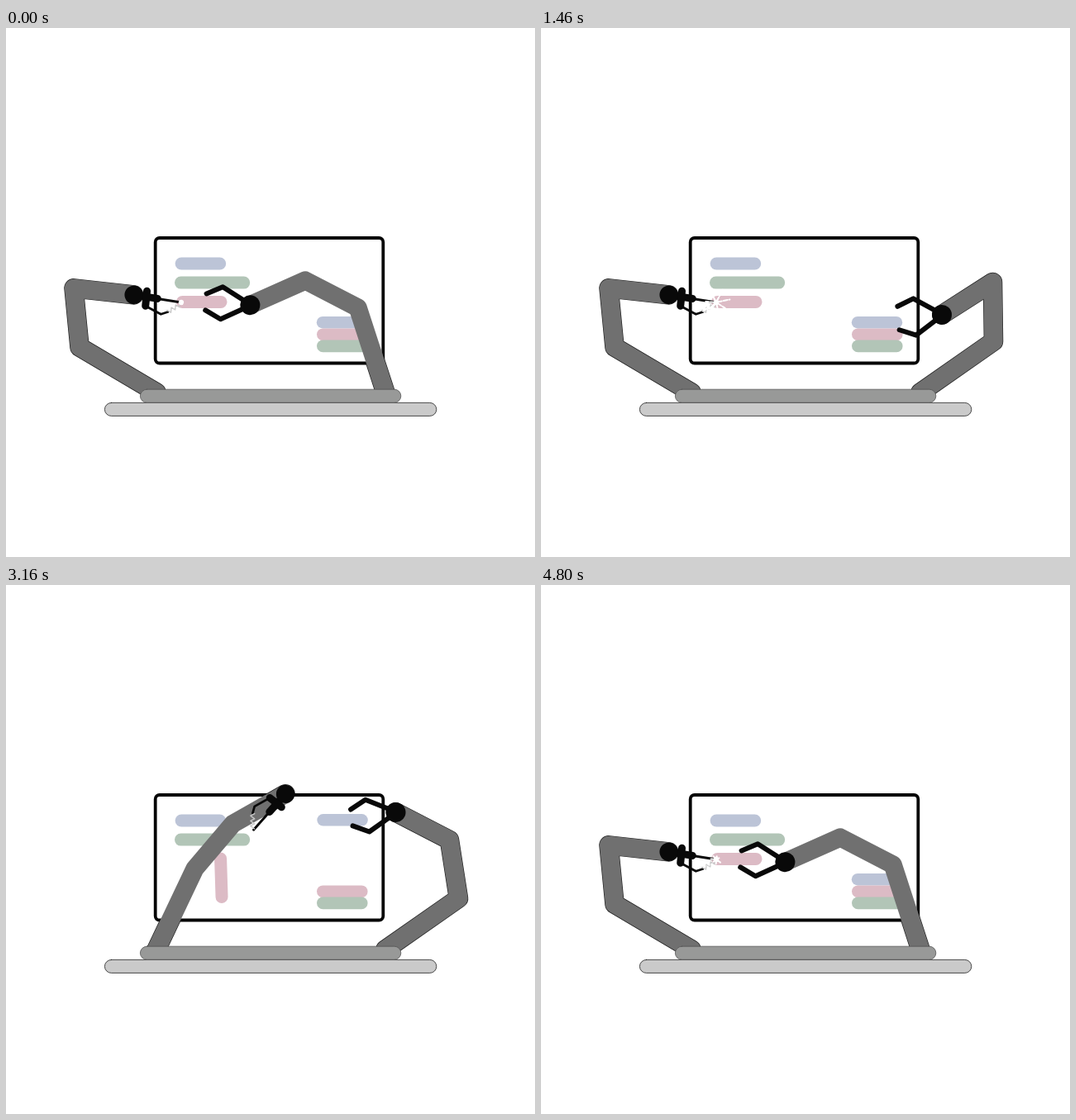
An HTML page with a canvas for the animation above (4820 ms loop, 640 by 640 pixels).

```html
<!DOCTYPE html>
<html lang="en">
<head>
<meta charset="utf-8">
<title>Robot arms</title>
<style>
  html, body { margin: 0; width: 640px; height: 640px; overflow: hidden; background: #fff; }
  canvas { display: block; }
</style>
</head>
<body>
<canvas id="stage" width="640" height="640"></canvas>
<script>
const ctx = document.getElementById('stage').getContext('2d');
const LOOP = 4820;
const BLACK = '#090909', ARM = '#707070', EDGE = '#222';
const BLUE = '#bcc4d7', GREEN = '#b2c5b7', PINK = '#dcbbc5';
const LENGTHS = [108, 71.5, 73];
const rad = deg => deg * Math.PI / 180;

// Poses: three absolute segment angles and the tool angle, in degrees.
const L_REST = [-149.4, -95.6, 6.3, 9];
const L_CUT = [-64.6, -49.7, -29.6, 131.6];
const L_BACK = [-145.6, -110.2, -30, 90];
const leftKeys = [
  [0, ...L_REST], [1740, ...L_REST],
  [2200, -92.6, -66, -16.8, 108.7],
  [2460, -50, -42, -36, 134],
  [2740, ...L_CUT], [3300, ...L_CUT],
  [3560, -95, -75, -30, 120],
  [3780, -118, -86, -30, 105],
  [4080, ...L_BACK], [4360, ...L_BACK],
  [4760, ...L_REST], [LOOP, ...L_REST]
];

const R_REST = [-108, -152.7, 156, 184];
const R_STACK = [-35, -90.8, 147.4, 175.5];
const R_LIFT = [-35, -98.9, 207.3, 173];
const rightKeys = [
  [0, ...R_REST], [620, ...R_REST],
  [820, -105.3, -150.6, 157.4, 180],
  [1080, -75, -113, 190, 178],
  [1140, -68, -101, 198, 178],
  [1310, -30, -83, 168, 176],
  [1440, ...R_STACK], [1660, ...R_STACK],
  [2120, ...R_LIFT], [3280, ...R_LIFT],
  [3720, ...R_STACK], [3790, ...R_STACK],
  [4120, -82.2, -132.7, 167.1, 92.5],
  [4340, -94, -143, 161, 125],
  [4700, ...R_REST], [LOOP, ...R_REST]
];

const jawKeys = [[0, 0], [560, 0], [720, 1], [1520, 1], [1640, 0], [3720, 0], [3800, 1], [4560, 1], [4720, 0], [LOOP, 0]];
const blueKeys = [[0, 356.2], [1660, 356.2], [2120, 284.3], [3280, 284.3], [3720, 356.2], [LOOP, 356.2]];
const swingKeys = [[0, 0], [2720, 0], [2900, -100], [3060, -91.8], [3260, -91.8], [3320, -90], [4440, -90], [4700, 0], [LOOP, 0]];

// Monotone cubic interpolation through the keys; it rests at turning points.
function sample(keys, t) {
  let i = 0;
  while (i < keys.length - 2 && t >= keys[i + 1][0]) i++;
  const [a, b] = [keys[i], keys[i + 1]];
  const span = b[0] - a[0];
  const u = (t - a[0]) / span;
  const slope = (k, c) => (keys[k + 1][c] - keys[k][c]) / (keys[k + 1][0] - keys[k][0]);
  const tangent = (k, c) => {
    if (k === 0 || k === keys.length - 1) return 0;
    const p = slope(k - 1, c), q = slope(k, c);
    return p * q > 0 ? 2 * p * q / (p + q) : 0;
  };
  return a.slice(1).map((v, n) => {
    const c = n + 1;
    return v + (b[c] - v) * u * u * (3 - 2 * u)
      + span * u * (1 - u) * (tangent(i, c) * (1 - u) - tangent(i + 1, c) * u);
  });
}

function line(points, width, color) {
  ctx.beginPath();
  points.forEach(([x, y]) => ctx.lineTo(x, y));
  ctx.lineWidth = width;
  ctx.strokeStyle = color;
  ctx.stroke();
}

function dot(x, y, r, color) {
  ctx.beginPath();
  ctx.arc(x, y, r, 0, Math.PI * 2);
  ctx.fillStyle = color;
  ctx.fill();
}

function pill(x, y, w, h, color, edge) {
  ctx.beginPath();
  ctx.roundRect(x, y, w, h, h / 2);
  ctx.fillStyle = color;
  ctx.fill();
  if (edge) {
    ctx.lineWidth = 0.8;
    ctx.strokeStyle = edge;
    ctx.stroke();
  }
}

// Runs draw in a frame with the given origin and rotation.
function at([x, y], deg, draw) {
  ctx.save();
  ctx.translate(x, y);
  ctx.rotate(rad(deg));
  draw();
  ctx.restore();
}

function jointsOf(base, angles) {
  const joints = [base];
  LENGTHS.forEach((len, i) => {
    const [x, y] = joints[i];
    joints.push([x + len * Math.cos(rad(angles[i])), y + len * Math.sin(rad(angles[i]))]);
  });
  return joints;
}

function drawArm(joints) {
  // The thin dark edge shows only outside the screen.
  ctx.save();
  ctx.beginPath();
  ctx.rect(0, 0, 640, 640);
  ctx.rect(179, 252, 279, 155);
  ctx.clip('evenodd');
  line(joints, 23.6, EDGE);
  ctx.restore();
  line(joints, 22.2, ARM);
}

function drawClaw(hand, deg, open) {
  at(hand, deg, () => {
    for (const side of [-1, 1]) {
      ctx.save();
      ctx.rotate(rad(side * 4.6 * open));
      line([[6, side * 4], [34.6, side * 19.5], [53.6, side * 10]], 6, BLACK);
      ctx.restore();
    }
    dot(0, 0, 12, BLACK);
  });
}

function drawCutter(hand, deg) {
  at(hand, deg, () => {
    line([[15, -7], [16, 11]], 9, BLACK);
    line([[0, 0], [29, 0]], 9, BLACK);
    line([[29, 0], [58, 0]], 3, BLACK);
    line([[16, 11], [36, 18], [44, 14]], 2.7, BLACK);
    const wire = [];
    for (let i = 0; i <= 6; i++) {
      const wave = i % 2 ? 2 : -2;
      wire.push([44 + i * 2.3 + wave * 0.7, 14 - i * 2 + wave]);
    }
    line(wire, 1.4, '#c9c9c9');
    dot(0, 0, 11.2, BLACK);
  });
}

function drawSparks(hand, deg, t) {
  const cutting = t < 1700;
  if (!cutting && t < 4700) return;
  at(hand, deg, () => {
    ctx.translate(58, 0);
    dot(0, 0, 3.2, '#fff');
    const power = cutting ? Math.min(1, t / 300) : 0.3;
    if (power < 0.02) return;
    ctx.setLineDash([5, 2]);
    for (let i = 0; i < 7; i++) {
      const dir = i * Math.PI * 2 / 7 - 0.5 + 0.15 * Math.sin(t / 70 + i);
      const len = power * (9 + 12 * Math.abs(Math.sin(t / 110 + i * 2.1)));
      line([[2 * Math.cos(dir), 2 * Math.sin(dir)], [len * Math.cos(dir), len * Math.sin(dir)]], 2, '#fff');
    }
    ctx.setLineDash([]);
    line([[-14, 13], [-9, 8], [-7, 9], [0, 0]], 2 * power, '#fff');
  });
}

function drawScreen(t) {
  ctx.beginPath();
  ctx.roundRect(180.7, 254, 275.6, 151.5, 5);
  ctx.lineWidth = 3.8;
  ctx.strokeStyle = '#050505';
  ctx.stroke();

  pill(204.6, 277.5, 61.6, 15, BLUE);
  pill(204, 300.6, 91.2, 15, GREEN);
  at([259.6, 331.4], sample(swingKeys, t)[0], () => pill(-53.6, -7.5, 61.5, 15, PINK));

  const blueY = sample(blueKeys, t)[0];
  pill(375.8 + (356.2 - blueY) * 0.008, blueY - 7.3, 61.4, 14.6, BLUE);
  pill(376, 363.4, 61.6, 14.8, PINK);
  pill(376, 377.4, 61.6, 14.8, GREEN);
}

function draw(t) {
  ctx.fillStyle = '#fff';
  ctx.fillRect(0, 0, 640, 640);
  ctx.lineCap = ctx.lineJoin = 'round';
  drawScreen(t);

  const left = sample(leftKeys, t);
  const right = sample(rightKeys, t);
  const leftJoints = jointsOf([182, 441], left);
  const rightJoints = jointsOf([459, 441], right);
  drawArm(leftJoints);
  drawArm(rightJoints);
  drawCutter(leftJoints[3], left[3]);
  drawSparks(leftJoints[3], left[3], t);
  drawClaw(rightJoints[3], right[3], sample(jawKeys, t)[0]);

  pill(119.4, 453.4, 401.4, 16, '#cacaca', EDGE);
  pill(162.4, 437.2, 315.4, 16, '#989998', '#555');
}

const start = performance.now();
function tick() {
  draw((performance.now() - start) % LOOP);
  requestAnimationFrame(tick);
}
tick();
</script>
</body>
</html>
```
